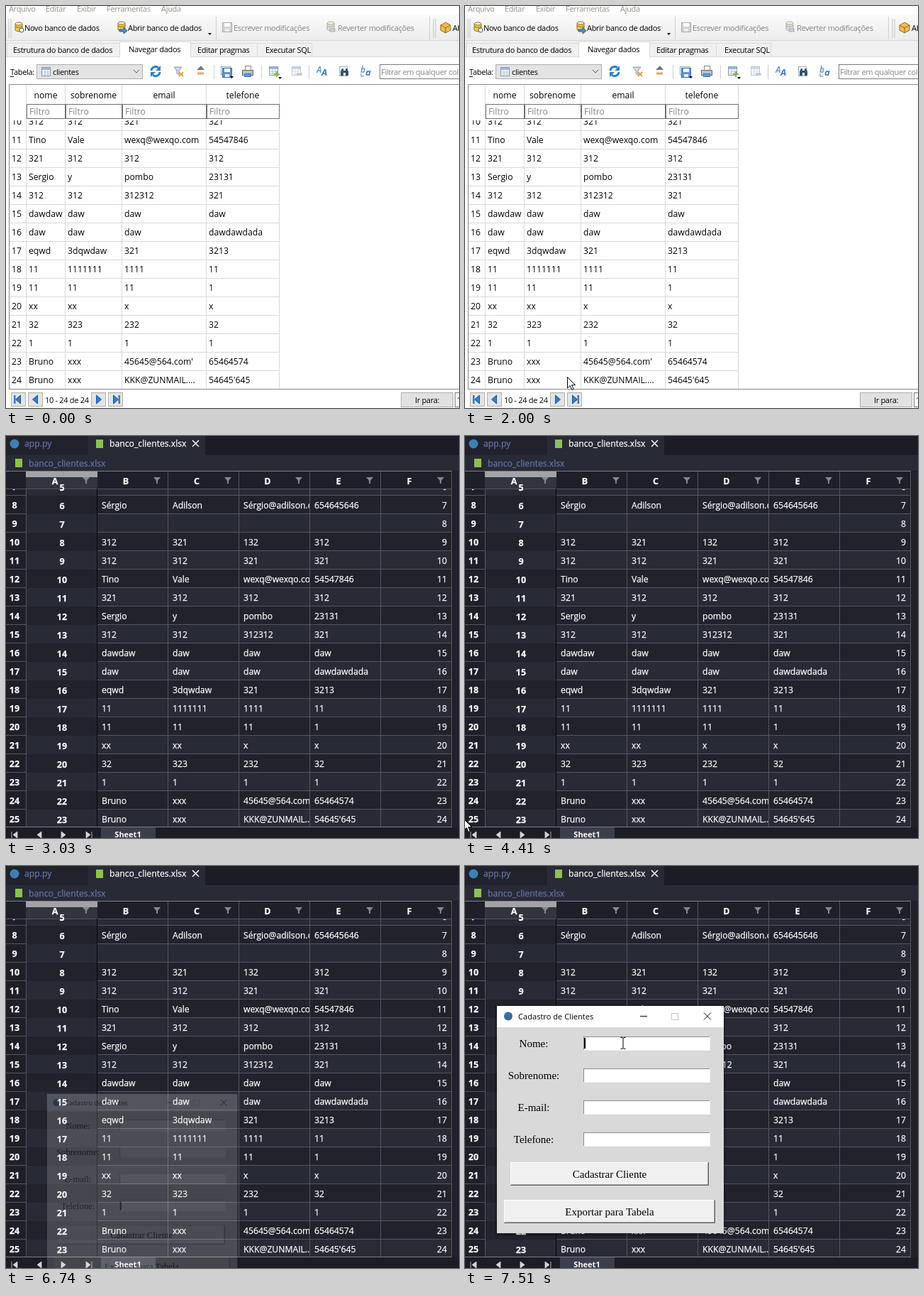
An HTML page that plays this animation: 639 px wide and 566 px high, repeating every 8000 ms.

```html
<!DOCTYPE html>
<html lang="pt">
<head>
<meta charset="utf-8">
<style>
  html, body { margin: 0; width: 100%; height: 100%; overflow: hidden; background: #fff; }
  svg { display: block; }
  text { font: 12.2px "Open Sans", "Noto Sans", sans-serif; white-space: pre; stroke-width: 0; }
  text.ui { font-size: 11px; letter-spacing: -.3px; }
  text.bold { font-weight: 700; font-size: 12.5px; }
  text.serif { font: 15px "Liberation Serif", serif; }
  #sheet text { stroke-width: .25px; }
</style>
</head>
<body>
<svg id="stage" width="639" height="566" viewBox="0 0 639 566"></svg>
<script>
const rect = (x, y, w, h, fill, stroke) => stroke
  ? `<rect x="${x + .5}" y="${y + .5}" width="${w - 1}" height="${h - 1}" fill="${fill}" stroke="${stroke}"/>`
  : `<rect x="${x}" y="${y}" width="${w}" height="${h}" fill="${fill}"/>`;
// y is the vertical centre of the line of text
const text = (x, y, s, fill = '#000', cls = '', anchor = 'start') =>
  `<text x="${x}" y="${y + (cls === 'ui' ? 4 : 5)}" fill="${fill}" stroke="${fill}" class="${cls}" text-anchor="${anchor}">${s}</text>`;
const path = (d, fill = 'none', stroke = 'none', width = 1) =>
  `<path d="${d}" fill="${fill}" stroke="${stroke}" stroke-width="${width}"/>`;
const at = (x, y, content) => `<g transform="translate(${x} ${y})">${content}</g>`;
const clip = (x, y, w, h, content) =>
  `<svg x="${x}" y="${y}" width="${w}" height="${h}" viewBox="${x} ${y} ${w} ${h}">${content}</svg>`;

// Records 6 to 24: nome, sobrenome, email, telefone
const FIRST = 6;
const records = `|||
Sérgio|Adilson|Sérgio@adilson.com|654645646
|||
312|321|132|312
312|312|321|321
Tino|Vale|wexq@wexqo.com|54547846
321|312|312|312
Sergio|y|pombo|23131
312|312|312312|321
dawdaw|daw|daw|daw
daw|daw|daw|dawdawdada
eqwd|3dqwdaw|321|3213
11|1111111|1111|11
11|11|11|1
xx|xx|x|x
32|323|232|32
1|1|1|1
Bruno|xxx|45645@564.com'|65464574
Bruno|xxx|KKK@ZUNMAIL....|54645'645`.split('\n').map(line => line.split('|'));

// ---- Light database window ----
const database = (tint = '#f2c84b', edge = '#8a7430') =>
  path('M-5-5v9q5 4 10 0v-9z', tint, edge) + `<ellipse cy="-5" rx="5" ry="2" fill="#fff3c0" stroke="${edge}"/>` +
  path('M-5-1q5 3 10 0', 'none', edge);
const floppy = (color, edge) => rect(-7, -7, 14, 14, color, edge) + rect(-4, -6, 8, 5, '#fff') + rect(-3, 2, 6, 4, '#e8eef6');
const funnel = path('M-6-6h11l-4 5v6l-3-2v-4z', '#d9dde2', '#8b929b');
const tableIcon = rect(-7, -7, 13, 13, '#fff', '#8a9aae') + rect(-6, -6, 11, 3, '#9cb9dd') +
  path('M-6 0h11M-6 3h11M-2-3v8M2-3v8', 'none', '#b7c1cd');
const dropArrow = path('M0 0h5l-2.5 3z', '#000');
const letters = (a, b) => `<text x="-8" y="2" style="font-weight:700;font-style:italic;font-size:12px" fill="#6d9ed6">${a}</text>` +
  `<text x="-1" y="6" style="font-weight:700;font-style:italic;font-size:13px" fill="#3c78bd">${b}</text>`;

function toolbar() {
  const menu = [[4, 'Arquivo'], [56, 'Editar'], [100, 'Exibir'], [142, 'Ferramentas'], [219, 'Ajuda']];
  let s = menu.map(([x, label]) => text(x, 4, label, '#93938a', 'ui')).join('');
  s += '<defs><linearGradient id="bar" x2="0" y2="1"><stop stop-color="#fafafa"/><stop offset="1" stop-color="#ececec"/></linearGradient></defs>';
  s += rect(0, 12, 639, 60, '#f0f0f0') + rect(0, 12, 639, 37, 'url(#bar)') + rect(0, 48, 639, 1, '#d5d5d5');
  for (const x of [4, 603]) s += path(`M${x} 18v27M${x + 3} 18v27`, 'none', '#c4c4c4');
  s += rect(296, 15, 1, 32, '#cfcfcf') + rect(597, 15, 1, 32, '#cfcfcf');
  s += at(18, 30, database() + `<circle cx="4" cy="4" r="3" fill="#fff" stroke="#555"/>`) + text(26, 31, 'Novo banco de dados', '#000', 'ui');
  s += at(163, 29, database() + path('M-3 4h6v-3l5 5-5 4v-3h-6z', '#4b8fd6', '#2c5e98')) + text(172, 31, 'Abrir banco de dados', '#000', 'ui');
  s += at(285, 38, dropArrow);
  s += at(312, 30, floppy('#d2d2d2', '#aaa')) + text(321, 31, 'Escrever modificações', '#858585', 'ui');
  s += at(458, 29, database('#ddd', '#aaa') + path('M-1 3h7v4h-7z', '#d0d0d0', '#aaa')) + text(468, 31, 'Reverter modificações', '#858585', 'ui');
  s += at(620, 30, path('M-7-3l7-4 7 4v7l-7 4-7-4z', '#f0bc55', '#97691f') + path('M-7-3l7 4 7-4M0 1v7', 'none', '#97691f'));
  return s + text(630, 31, 'Abrir', '#000', 'ui');
}

function tabs() {
  const list = [[1, 161, 'Estrutura do banco de dados', 10], [260, 95, 'Editar pragmas', 270], [354, 78, 'Executar SQL', 366]];
  let s = list.map(([x, w, label, tx]) => rect(x, 52, w, 21, '#f0f0f0', '#d9d9d9') + text(tx, 62, label, '#000', 'ui')).join('');
  s += rect(0, 71, 639, 495, '#fff') + rect(0, 71, 639, 1, '#dcdcdc');
  return s + rect(160, 50, 101, 23, '#fff', '#d9d9d9') + rect(161, 71, 99, 3, '#fff') + text(173, 61, 'Navegar dados', '#000', 'ui');
}

function tableTools() {
  let s = text(6, 93, 'Tabela:', '#000', 'ui') + rect(6, 99, 5, 1, '#000');
  s += rect(43, 82, 150, 21, '#e3e3e3', '#adadad') + at(57, 93, tableIcon) + text(66, 93, 'clientes', '#000', 'ui');
  s += path('M180 90l4 4 4-4', 'none', '#555');
  s += at(211, 92, path('M-6-1a6 6 0 0 1 10-4M6 1a6 6 0 0 1-10 4', 'none', '#2f7fc6', 3) + path('M7-8v7h-7zM-7 8v-7h7z', '#2f7fc6'));
  s += at(243, 92, funnel + path('M1 1l6 6M7 1l-6 6', 'none', '#e5a13c', 2));
  s += at(275, 92, path('M-6-2h11l-5-6z', '#777') + path('M-5 3h9', 'none', '#e2a36b', 3));
  for (const x of [293, 360, 427]) s += rect(x, 83, 1, 20, '#d0d0d0');
  s += at(311, 92, rect(-8, -7, 14, 12, '#fff', '#88a6cb') + at(1, 2, floppy('#5f94d1', '#3a6ba5'))) + at(316, 99, dropArrow);
  s += at(341, 92, rect(-4, -8, 9, 7, '#fff', '#888') + rect(-8, -2, 16, 8, '#b9c0c8', '#666') + rect(-5, 3, 10, 5, '#5c9bdb', '#4477aa'));
  s += at(378, 92, tableIcon + path('M0 4h8M4 0v8', 'none', '#92b05a', 2)) + at(384, 100, dropArrow);
  s += at(410, 92, `<g opacity=".55">${tableIcon}${path('M0 4h8', 'none', '#999', 3)}</g>`);
  s += at(446, 92, letters('A', 'A'));
  s += at(477, 92, rect(-7, -7, 12, 14, '#fff', '#9aa9bb') + path('M-5 6v-6l2-4h2v3h3v-3h2l2 4v6h-4v-4h-3v4z', '#34516f'));
  s += at(508, 92, letters('b', 'a') + path('M-7 3v4h4', 'none', '#3c78bd'));
  return s + rect(527, 82, 120, 21, '#fff', '#7a7a7a') + text(529, 93, 'Filtrar em qualquer coluna', '#858585', 'ui');
}

function lightTable() {
  const edges = [29, 84, 164, 283, 386];
  let body = '';
  for (let n = 10; n <= 24; n++) {
    const y = 162 + (n - 10) * 26;
    body += text(22, y, n, '#000', '', 'end') + rect(5, y + 13, 381, 1, '#d8d8d8');
    records[n - FIRST].forEach((cell, i) => body += text(edges[i] + 3, y, cell));
  }
  edges.forEach(x => body += rect(x - 1, 111, 1, 428, '#d8d8d8'));
  let s = rect(4, 110, 640, 430, '#fff', '#828790') + '<rect id="hover" x="5" y="514" width="23" height="25" fill="#d9ebf9"/>';
  s += clip(5, 161, 400, 378, body);
  ['nome', 'sobrenome', 'email', 'telefone'].forEach((label, i) => {
    const x = edges[i], w = edges[i + 1] - x;
    s += text(x + w / 2 - .5, 125, label, '#000', '', 'middle') + rect(x + w - 1, 111, 1, 27, '#d8d8d8');
    s += rect(x, 138, w, 21, '#fff', '#707070') + text(x + 4, 148, 'Filtro', '#858585');
  });
  return s + rect(28, 111, 1, 50, '#d8d8d8');
}

function pager() {
  const blue = '#2f7fd0';
  const arrow = (x, dir, bar) => rect(x, 544, 21, 20, '#e4e4e4', '#adadad') + at(x + 10.5, 554,
    `<g transform="scale(${dir} 1)">${path('M-3-6v12l7-6z', blue, '#1b5799')}${bar ? rect(4, -6, 2.5, 12, blue) : ''}</g>`);
  return arrow(7, -1, true) + arrow(31, -1) + arrow(120, 1) + arrow(144, 1, true) +
    text(55, 555, '10 - 24 de 24', '#000', 'ui') + rect(557, 544, 74, 21, '#e1e1e1', '#adadad') +
    text(594, 555, 'Ir para:', '#000', 'ui', 'middle') + rect(633, 544, 20, 21, '#fff', '#7a7a7a') + text(636, 555, '1', '#000', 'ui');
}

// ---- Dark spreadsheet window ----
function spreadsheet() {
  const white = '#fafafa', line = '#55565e', border = '#7c7d84', dim = '#6474a8';
  const fileIcon = (x, y) => rect(x - 5, y - 6, 10, 12, '#8cc152');
  let s = rect(0, 0, 639, 566, '#1b1c25') + rect(0, 0, 114, 27, '#21222c') + rect(115, 0, 166, 27, '#282a36');
  s += '<circle cx="12" cy="11" r="6.5" fill="#3f7fb5"/>' + text(26, 10, 'app.py', dim);
  s += fileIcon(132, 11) + text(146, 10, 'banco_clientes.xlsx', white) + path('M263 6l9 9M272 6l-9 9', 'none', white, 1.5);
  s += rect(0, 27, 639, 22, '#282a36') + fileIcon(18, 38) + text(32, 38, 'banco_clientes.xlsx', dim);

  let grid = '', cells = ['', '', '', '', '', ''];
  for (let n = 7; n <= 25; n++) {
    const y = 97 + (n - 8) * 26;
    grid += rect(0, y - 13, 629, 26, n % 2 ? '#282a36' : '#21222c') + rect(0, y - 13, 28, 26, '#1e1f29');
    grid += rect(0, y + 12, 28, 1, line) + rect(129, y + 12, 500, 1, line) + text(12, y, n, white, 'bold', 'middle');
    cells[0] += text(79, y + 1, n - 2, white, 'bold', 'middle');
    records[n - 1 - FIRST].forEach((cell, i) => cells[i + 1] += text(135 + i * 100, y, cell, white));
    cells[5] += text(622, y, n - 1, white, '', 'end');
  }
  s += clip(0, 74, 639, 477, grid + cells.map((c, i) => clip(28 + i * 100, 74, 100, 477, c)).join(''));
  s += rect(0, 49, 629, 25, '#1e1f29') + rect(0, 74, 629, 1, line);
  for (let x = 28; x <= 628; x += 100) s += rect(x, 50, 1, 501, x === 128 ? '#08080c' : line);
  s += rect(0, 49, 629, 1, border) + rect(0, 550, 629, 1, border);
  // Selected column header
  s += rect(28, 50, 101, 24, '#323440') + rect(28, 50, 101, 8, '#a3a3a7');
  s += clip(28, 68, 100, 9, text(79, 72, 5, white, 'bold', 'middle'));
  for (let i = 0; i < 6; i++) {
    const x = 28 + i * 100;
    s += text(x + 41, 63, 'ABCDEF'[i], white, 'bold', 'middle') + path(`M${x + 80} 58h10l-4 5v4h-2v-4z`, '#85868d');
  }
  s += rect(629, 50, 10, 501, '#20212b') + rect(0, 551, 639, 15, '#1b1c25') + rect(134, 551, 77, 15, '#3c3e4d');
  s += path('M8 557v10M16 557v9l-6-4.5zM50 557v9l-6-4.5zM78 557v9l6-4.5zM113 557v9l6-4.5zM121 557v10', '#d4d4d8', '#d4d4d8', .8);
  return s + `<text x="172" y="565" text-anchor="middle" fill="${white}" style="font-weight:700;font-size:11px">Sheet1</text>`;
}

// ---- Registration dialog, drawn from its own top left corner ----
const ENTRIES = [53, 98, 143, 188];
function dialog() {
  const button = (x, y, w, label) => rect(x, y, w, 33, '#696969') + rect(x, y, w - 1, 32, '#fff') +
    rect(x + 1, y + 1, w - 2, 31, '#a0a0a0') + rect(x + 1, y + 1, w - 3, 30, '#f0f0f0') +
    text(x + w / 2, y + 17, label, '#000', 'serif', 'middle');
  let s = '<rect x="-3" y="-1" width="326" height="325" rx="3" fill="#000" opacity=".18"/>';
  s += rect(0, 0, 320, 320, '#d9d9d9') + rect(0, 0, 320, 30, '#fff');
  s += '<circle cx="16" cy="14.5" r="6" fill="#3d6c9c"/>';
  s += '<text x="30" y="19" style="font-size:11.1px">Cadastro de Clientes</text>';
  s += path('M202 14.5h10M292 9.5l10 10M302 9.5l-10 10', 'none', '#000') + rect(246, 10, 10, 10, 'none', '#c4c4c4');
  ['Nome:', 'Sobrenome:', 'E-mail:', 'Telefone:'].forEach((label, i) => {
    const y = ENTRIES[i];
    s += text(52, y, label, '#000', 'serif', 'middle') + rect(122, y - 10, 179, 20, '#f4f4f4') +
      rect(122, y - 10, 178, 19, '#8c8c8c') + rect(123, y - 9, 177, 18, '#fff');
  });
  return s + button(19, 220, 280, 'Cadastrar Cliente') + button(10, 273, 298, 'Exportar para Tabela') +
    '<rect id="caret" x="123" width="2" height="15" fill="#000"/>';
}

const stage = document.getElementById('stage');
stage.innerHTML =
  `<g id="light">${rect(0, 0, 639, 566, '#fff')}${toolbar()}${tabs()}${tableTools()}${lightTable()}${pager()}</g>` +
  `<g id="dark"><g id="sheet">${spreadsheet()}</g><g id="dialog">${dialog()}</g></g>` +
  `<g id="pointer"><g id="arrow">${path('M.5.5v15.5l3.7-3.5 2.6 6 2.4-1-2.6-5.8h5z', '#fff', '#000')}</g>` +
  `<g id="beam">${path('M-3.5-7.5h2.5l1 1 1-1h2.5M0-7v15M-3.5 8.5h2.5l1-1 1 1h2.5', 'none', '#000')}</g></g>`;
const part = id => document.getElementById(id);
const show = (id, on) => part(id).setAttribute('display', on ? 'inline' : 'none');
const move = (id, x, y, scale = 1) => part(id).setAttribute('transform', `translate(${x} ${y}) scale(${scale})`);

// Pointer strokes: start, arrival, end of stay, from, to, easing
const easeIn = power => u => u ** power;
const easeOut = power => u => 1 - (1 - u) ** power;
const strokes = [
  [260, 1030, 1300, [399, 560], [8, 525], easeOut(1.6)],
  [1300, 2630, 2700, [7, 524], [433, 519], easeIn(1.77)],
  [3360, 4140, 4210, [630, 470], [0, 531], easeOut(1.4)],
  [4210, 4410, 4410, [-1, 531], [-2, 539], easeIn(1)],
  [4410, 5800, 5870, [-2, 539], [529, 531], easeIn(1.25)],
  [6950, 7370, 8000, [270, 566], [223, 249], easeOut(1.5)],
];
const STEP = 70, DIALOG_X = 45, DIALOG_Y = 197;

function pointerAt(t) {
  const stroke = strokes.find(([start, , end]) => t >= start && t < end);
  if (!stroke) return null;
  const [start, arrival, , from, to, ease] = stroke;
  const elapsed = Math.floor((t - start) / STEP + .01) * STEP;
  const k = ease(Math.min(1, elapsed / (arrival - start)));
  return from.map((v, i) => Math.round(v + (to[i] - v) * k));
}

function draw(t) {
  const dark = t >= 3030;
  show('light', !dark);
  show('dark', dark);

  const pointer = pointerAt(t);
  show('pointer', pointer);
  show('hover', pointer && pointer[0] < 29 && pointer[1] > 512 && pointer[1] < 540);
  if (pointer) {
    const [x, y] = pointer;
    const overEntry = t > 6900 && x > 167 && x < 345 && ENTRIES.some(c => Math.abs(y - DIALOG_Y - c) < 10);
    move('pointer', x, y);
    show('arrow', !overEntry);
    show('beam', overEntry);
  }

  show('dialog', t >= 6670);
  const opened = 6670 + Math.floor((t - 6670) / STEP + .01) * STEP;
  const u = Math.max(0, Math.min(1, (opened - 6655) / 300));
  const e = u * u * (3 - 2 * u);
  move('dialog', DIALOG_X + 16 * (1 - e), DIALOG_Y + 154 * (1 - e), .8 + .2 * e);
  part('dialog').setAttribute('opacity', e);
  show('caret', t < 7370 || t >= 7510);
  part('caret').setAttribute('y', ENTRIES[t < 7370 ? 3 : 0] - 8);
}

function frame() {
  draw(performance.now() % 8000);
  requestAnimationFrame(frame);
}
frame();
</script>
</body>
</html>
```
